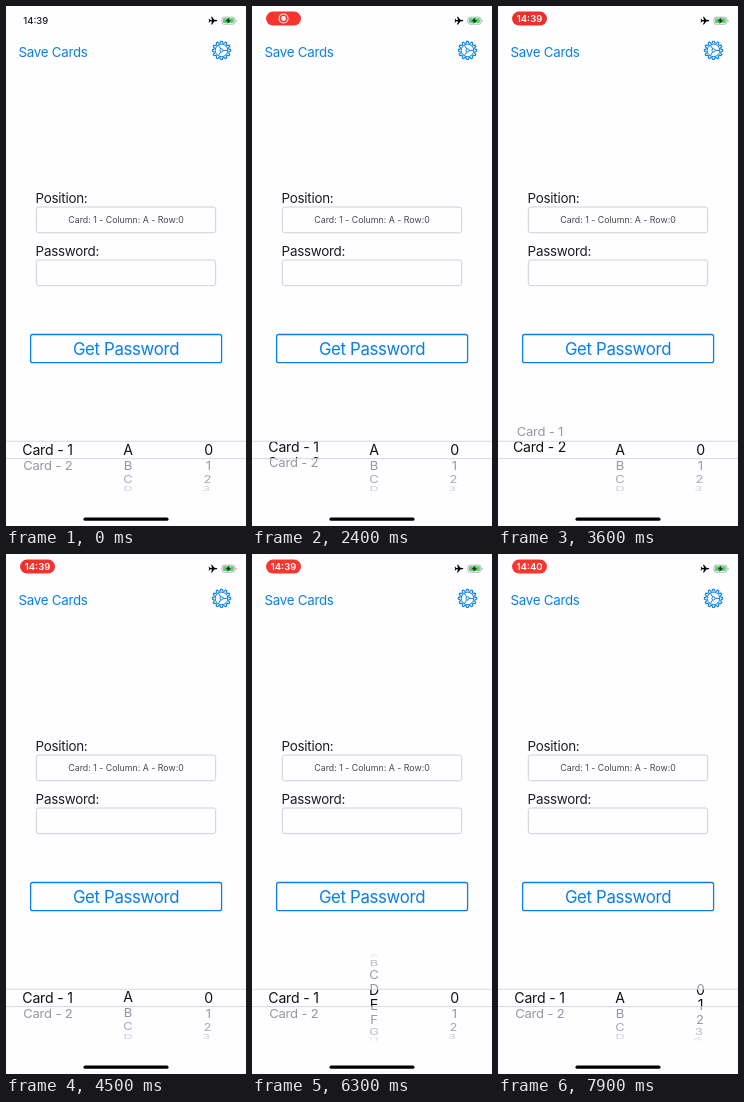
An HTML page with a canvas that plays this animation: 240 px wide and 520 px high, repeating every 8 s.

```html
<!DOCTYPE html>
<html lang="en">
<head>
<meta charset="utf-8">
<title>Password card picker</title>
<style>
  html, body { margin: 0; width: 100%; height: 100%; overflow: hidden; background: #fefdff; }
  canvas { display: block; width: 240px; height: 520px; }
</style>
</head>
<body>
<canvas id="stage"></canvas>
<script>
const W = 240, H = 520, LOOP = 8000, STEP = 100;
const BLUE = '#0a7fea', INK = '#1c1c1e', BG = '#fefdff';
const FONT = 'Inter, "Liberation Sans", sans-serif';
const BAND = { top: 435.3, bottom: 452.7, mid: 444 };
const WHEEL = { radius: 43.9, angle: 0.361 };

const canvas = document.getElementById('stage');
const ctx = canvas.getContext('2d');
const dpr = window.devicePixelRatio || 1;
canvas.width = W * dpr;
canvas.height = H * dpr;

// Each column: centre x, labels, and [ms, row] points of its scroll.
const columns = [
  { x: 41.5, rows: ['Card - 1', 'Card - 2'],
    path: [[2200, 0], [2400, .21], [2900, 1.05], [3250, 1.28], [3600, 1.21], [4000, .6], [4300, 0]] },
  { x: 122, rows: [...'ABCDEFGHIJ'],
    path: [[4400, 0], [4900, .9], [5300, 1.85], [5800, 2.9], [6300, 3.54], [6500, 3.6], [7000, 1], [7300, 0]] },
  { x: 202.5, rows: [...'0123456789'],
    path: [[7500, 0], [7900, .54], [8000, .75]] }
];

const clamp = v => Math.max(0, Math.min(1, v));
const fade = (t, start, length) => clamp((t - start) / length);

function slope(path, i) {
  if (i === 0 || i === path.length - 1) return 0;
  const [a, b, c] = [path[i - 1], path[i], path[i + 1]];
  if ((b[1] - a[1]) * (c[1] - b[1]) <= 0) return 0;
  return (c[1] - a[1]) / (c[0] - a[0]);
}

// Hermite curve through the points, flat at turning points.
function along(path, t) {
  if (t <= path[0][0]) return path[0][1];
  const i = path.findIndex(p => p[0] > t) - 1;
  if (i < 0) return path[path.length - 1][1];
  const [t0, v0] = path[i], [t1, v1] = path[i + 1];
  const d = t1 - t0, u = (t - t0) / d, w = 1 - u;
  return v0 * (1 + 2 * u) * w * w + v1 * u * u * (3 - 2 * u)
    + d * u * w * (slope(path, i) * w - slope(path, i + 1) * u);
}

function text(str, x, y, size, { color = INK, align = 'left', weight = 400, track = 0 } = {}) {
  ctx.font = `${weight} ${size}px ${FONT}`;
  ctx.letterSpacing = `${track * size}px`;
  ctx.textAlign = align;
  ctx.textBaseline = 'alphabetic';
  ctx.fillStyle = color;
  ctx.fillText(str, x, y);
}

function roundBox(x, y, w, h, r) {
  ctx.beginPath();
  ctx.roundRect(x, y, w, h, r);
}

function frame(x, y, w, h, r, color, width) {
  roundBox(x, y, w, h, r);
  ctx.strokeStyle = color;
  ctx.lineWidth = width;
  ctx.stroke();
}

function fillBox(x, y, w, h, r, color) {
  roundBox(x, y, w, h, r);
  ctx.fillStyle = color;
  ctx.fill();
}

function polygon(points, color) {
  ctx.beginPath();
  points.forEach(([x, y]) => ctx.lineTo(x, y));
  ctx.closePath();
  ctx.fillStyle = color;
  ctx.fill();
}

function ring(x, y, r, color, width) {
  ctx.beginPath();
  ctx.arc(x, y, r, 0, Math.PI * 2);
  ctx.strokeStyle = color;
  ctx.lineWidth = width;
  ctx.stroke();
}

function plane(x, y) {
  const half = [[4.4, 0], [3.6, -.7], [1.3, -.8], [-1, -3.9], [-2, -3.9],
                [-.9, -.8], [-2.8, -.7], [-3.7, -1.8], [-4.4, -1.8], [-3.8, 0]];
  const lower = half.map(([a, b]) => [a, -b]).reverse();
  polygon([...half, ...lower].map(([a, b]) => [x + a, y + b]), '#000');
}

function battery() {
  frame(215.9, 11.2, 13, 7, 2, '#a3a3a6', .8);
  fillBox(229.6, 13.5, .9, 2.4, .5, '#a3a3a6');
  fillBox(217, 12.3, 10.8, 4.8, 1, '#4cd964');
  polygon([[223.4, 11.6], [219.4, 15.2], [221.8, 15.2], [221.2, 17.8],
           [225.4, 14.2], [222.9, 14.2]], '#1c2a20');
}

function gear(x, y) {
  const teeth = 12, turn = Math.PI * 2 / teeth;
  ctx.beginPath();
  for (let i = 0; i < teeth; i++) {
    [[-.32, 7.6], [-.16, 9.2], [.16, 9.2], [.32, 7.6]].forEach(([a, r]) => {
      const angle = (i + a) * turn;
      ctx.lineTo(x + r * Math.cos(angle), y + r * Math.sin(angle));
    });
  }
  ctx.closePath();
  ctx.strokeStyle = BLUE;
  ctx.lineWidth = 1.1;
  ctx.lineJoin = 'round';
  ctx.stroke();
  ring(x, y, 6.3, BLUE, 1);
  ring(x, y, 1.6, BLUE, 1);
  ctx.beginPath();
  for (let i = 0; i < 3; i++) {
    const angle = i * Math.PI * 2 / 3, c = Math.cos(angle), s = Math.sin(angle);
    ctx.moveTo(x + 1.6 * c, y + 1.6 * s);
    ctx.lineTo(x + 6.3 * c, y + 6.3 * s);
  }
  ctx.stroke();
}

function statusBar(t) {
  const pill = fade(t, 300, 300), clock = fade(t, 2800, 300);
  const time = t < 7000 ? '14:39' : '14:40';
  ctx.globalAlpha = 1 - pill;
  text(time, 29.8, 17.9, 9.5, { align: 'center', weight: 500 });

  const glow = .5 - .5 * Math.cos((t - 1100) / 1000 * Math.PI);
  const mix = (a, b) => Math.round(a + (b - a) * glow);
  ctx.globalAlpha = pill;
  fillBox(14, 5.6, 35, 13.9, 6.95, `rgb(${mix(219, 255)},${mix(42, 54)},${mix(40, 48)})`);
  ctx.globalAlpha = pill * (1 - clock);
  ring(31.5, 12.5, 4.5, '#fff', 1.1);
  ctx.beginPath();
  ctx.arc(31.5, 12.5, 2.4, 0, Math.PI * 2);
  ctx.fillStyle = '#fff';
  ctx.fill();
  ctx.globalAlpha = pill * clock;
  text(time, 31.5, 16, 9.5, { align: 'center', weight: 600, color: '#fff' });
  ctx.globalAlpha = 1;

  plane(207, 14.6);
  battery();
}

function wheelRows(col, pos, size, strength) {
  col.rows.forEach((label, i) => {
    const angle = (i - pos) * WHEEL.angle;
    if (Math.abs(angle) > 1.45) return;
    const c = Math.cos(angle), depth = 1 - .056 * (1 - c);
    ctx.save();
    ctx.translate(120 + (col.x - 120) * depth, BAND.mid + WHEEL.radius * Math.sin(angle));
    ctx.scale(depth, c);
    ctx.globalAlpha = strength || .43 * clamp(1.3 * (c - .1));
    text(label, 0, size * .364, size, { align: 'center', track: -.015, color: '#111' });
    ctx.restore();
  });
}

function clipped(rects, draw) {
  ctx.save();
  ctx.beginPath();
  rects.forEach(([y0, y1]) => ctx.rect(0, y0, W, y1 - y0));
  ctx.clip();
  draw();
  ctx.restore();
}

function picker(t) {
  const positions = columns.map(col => along(col.path, t));
  clipped([[390, BAND.top], [BAND.bottom, 500]], () =>
    columns.forEach((col, i) => wheelRows(col, positions[i], 13.1)));
  clipped([[BAND.top, BAND.bottom]], () =>
    columns.forEach((col, i) => wheelRows(col, positions[i], 14.1, 1)));
  ctx.fillStyle = '#cfced2';
  ctx.fillRect(0, 434.8, W, .8);
  ctx.fillRect(0, 452.3, W, .8);
}

function draw(t) {
  ctx.setTransform(dpr, 0, 0, dpr, 0, 0);
  ctx.fillStyle = BG;
  ctx.fillRect(0, 0, W, H);

  statusBar(t);
  text('Save Cards', 12.6, 50.8, 13.3, { color: BLUE, track: -.02 });
  gear(215.5, 44.4);

  text('Position:', 29.6, 197, 13.4, { track: -.02 });
  frame(30.3, 201, 179.4, 25.8, 2.5, '#cbcacd', .9);
  text('Card: 1 - Column: A - Row:0', 120, 217, 8.8, { align: 'center', color: '#48484a' });
  text('Password:', 29.6, 250, 13.4, { track: -.02 });
  frame(30.3, 254, 179.4, 25.6, 2.5, '#cbcacd', .9);

  frame(24.6, 328.5, 191, 28.2, 2, BLUE, 1.3);
  text('Get Password', 120, 349.2, 16.8, { align: 'center', color: BLUE, track: -.02 });

  picker(t);
  fillBox(77.5, 511.6, 85, 3.1, 1.55, '#000');
}

const start = performance.now();
function tick() {
  const t = (performance.now() - start) % LOOP;
  draw(Math.floor(t / STEP) * STEP);
  requestAnimationFrame(tick);
}
draw(0);
requestAnimationFrame(tick);
</script>
</body>
</html>
```
